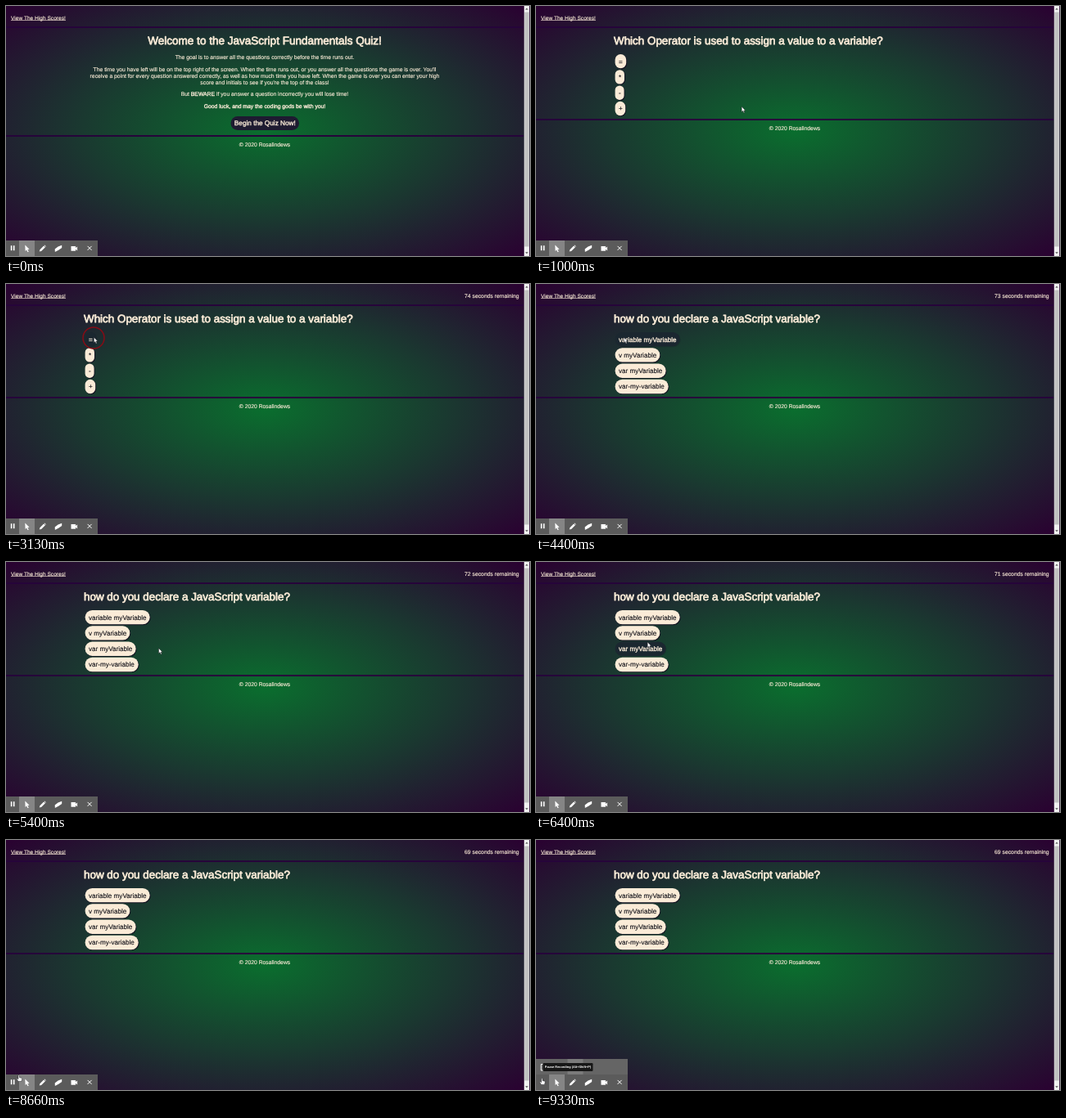
Recreate the animation shown at these times as an HTML page. Size 640x306 px, loop 9.4 s.

```html
<!DOCTYPE html>
<html lang="en">
<head>
<meta charset="utf-8">
<title>JavaScript quiz</title>
<style>
html, body { margin: 0; width: 100%; height: 100%; overflow: hidden; background: #21152f; }
svg { display: block; width: 100vw; height: 100vh; }
text { font-family: "Liberation Sans", Arial, sans-serif; font-size: 6.8px; fill: #faebd7; stroke: #faebd7; stroke-width: .14px; stroke-linejoin: round; text-rendering: geometricPrecision; white-space: pre; }
.bold { stroke-width: .36px; }
.head { font-size: 13.42px; stroke-width: .75px; }
.mid { text-anchor: middle; }
.pill text { font-size: 8.1px; fill: #15151c; stroke: #15151c; }
.pill .face { fill: #faebd7; }
.pill .shade { fill: #140d20; opacity: .85; }
.pill.hot .face { fill: #1b2730; }
.pill.hot .shade { opacity: .15; }
.pill.hot text { fill: #faebd7; stroke: #faebd7; stroke-width: .36px; }
</style>
</head>
<body>
<svg id="stage" viewBox="0 0 640 306" preserveAspectRatio="none">
  <defs>
    <radialGradient id="glow" gradientUnits="userSpaceOnUse" cx="0" cy="0" r="1" gradientTransform="translate(316 153) scale(447 216)">
      <stop offset="0" stop-color="#0a6e2e"/>
      <stop offset=".5" stop-color="#1a3930"/>
      <stop offset="1" stop-color="#2a0131"/>
    </radialGradient>
  </defs>
  <rect width="640" height="306" fill="url(#glow)"/>
  <text x="6" y="16.5" style="font-size:6.6px">View The High Scores!</text>
  <rect x="6" y="17.3" width="67" height=".6" fill="#faebd7"/>
  <text id="timer" x="626.6" y="16.5" text-anchor="end"></text>
  <rect y="25" width="632" height="2" fill="#26043a"/>

  <g id="intro">
    <text class="head mid" x="316" y="47.2" style="font-size:13.54px">Welcome to the JavaScript Fundamentals Quiz!</text>
    <text class="mid" x="316" y="65.3">The goal is to answer all the questions correctly before the time runs out.</text>
    <text class="mid" x="316" y="79.5">The time you have left will be on the top right of the screen. When the time runs out, or you answer all the questions the game is over. You'll</text>
    <text class="mid" x="316" y="87.8">receive a point for every question answered correctly, as well as how much time you have left. When the game is over you can enter your high</text>
    <text class="mid" x="316" y="95.9">score and initials to see if you're the top of the class!</text>
    <text class="mid" x="316" y="110">But <tspan class="bold">BEWARE</tspan> if you answer a question incorrectly you will lose time!</text>
    <text class="mid bold" x="316" y="124.5">Good luck, and may the coding gods be with you!</text>
    <rect x="274.5" y="135" width="83.5" height="17" rx="8.5" fill="#1e1b31"/>
    <text class="mid bold" x="316.3" y="146.4" style="font-size:8.23px">Begin the Quiz Now!</text>
  </g>
  <g id="quiz"></g>
  <g id="foot">
    <rect y="-1" width="632" height="2" fill="#26043a"/>
    <text class="mid" x="316" y="13.4">© 2020 Rosalindews</text>
  </g>

  <rect x="632.8" width="6.4" height="306" fill="#f1f1f1"/>
  <rect x="633.2" y="7.5" width="5.4" height="287" fill="#c1c1c1"/>
  <path d="M634.2 4.6L636 2.6L637.8 4.6ZM634.2 301.2L636 303.2L637.8 301.2Z" fill="#555"/>

  <g id="panel">
    <rect y="268" width="112" height="20" fill="#656565"/>
    <rect x="38.5" y="268" width="19" height="19" fill="#7b7b7b"/>
    <path d="M8.5 274.5H6.2V282H8.5" fill="none" stroke="#fff"/>
  </g>
  <rect y="287" width="112" height="19" fill="#5b5b5b"/>
  <rect x="16" y="287" width="19" height="19" fill="#858585"/>
  <g fill="#fff">
    <path id="pause" d="M5.8 293.3H7.4V299.3H5.8ZM8.9 293.3H10.5V299.3H8.9Z"/>
    <path d="M23.3 292.6L23.6 300L25.1 298.5L26.5 301.3L27.7 300.7L26.4 298L28.5 297.7Z"/>
    <path d="M40.8 300.6L41.4 298.2L46.1 293.5L47.9 295.3L43.2 300ZM46.6 293L47.2 292.5L48.9 294.2L48.4 294.8Z"/>
    <path d="M59.7 297.4L63.6 294.6L68.2 292.8V296L64.2 298.8L59.9 300.9Z"/>
    <path d="M79.5 294.1H85V296L87.1 294.4V299.4L85 297.8V299.8H79.5Z"/>
    <path d="M99.6 293.9L104.6 298.9M104.6 293.9L99.6 298.9" stroke="#fff" stroke-width="1"/>
  </g>
  <g id="tip">
    <rect x="8.5" y="273" width="61" height="10" rx="1.3" fill="#161616"/>
    <text class="mid" x="39" y="279.4" style="font-size:3.9px;font-weight:bold;fill:#fff;stroke:none">Pause Recording (Alt+Shift+P)</text>
  </g>

  <circle id="ring" r="13" fill="none" stroke="#860c16" stroke-width="1.5"/>
  <g id="mouse" stroke="#15151a" stroke-width=".45" fill="#fff">
    <path id="arrow" d="M0 0V6.6L1.5 5.2L2.6 7.7L3.7 7.2L2.6 4.8H4.6Z"/>
    <path id="hand" d="M-.8 -1Q0 -1.9 .7 -1V1.6L3.3 2.2Q4 2.5 3.8 3.5L3.2 6.4H-.7L-2.8 3.4Q-2.6 2.5 -1.7 3L-.8 3.7Z"/>
  </g>
</svg>
<script>
const LOOP = 9400, STEP = 1000 / 15;
const BEGIN_AT = 330, NEXT_AT = 3590;
const PILL_X = 96.6, PILL_H = 17.4;
const $ = id => document.getElementById(id);

// each answer: label, pill width
const quizzes = [
  { ask: "Which Operator is used to assign a value to a variable?",
    answers: [["=", 13.6], ["*", 11.4], ["-", 11], ["+", 12.6]] },
  { ask: "how do you declare a JavaScript variable?",
    answers: [["variable myVariable", 79.1], ["v myVariable", 54.7],
              ["var myVariable", 62], ["var-my-variable", 65.1]] }
];

// cursor: time, x, y
const path = [
  [0, 301, 146], [200, 301, 146], [460, 251.2, 123.1], [1000, 251.2, 123.1],
  [1200, 205, 108], [1400, 205, 108], [1660, 150, 86], [2130, 150, 86],
  [2460, 110, 68], [2600, 107.4, 65.2], [4400, 107.4, 65.2], [4600, 128, 76],
  [4800, 128, 76], [5130, 186.5, 105.4], [5400, 186.5, 105.4], [5900, 150, 119],
  [6400, 136.2, 98], [6730, 128, 124], [7060, 128, 124], [7460, 98, 200],
  [7730, 94, 209], [7867, 86.5, 225], [8660, 16, 289], [8930, 7.3, 293], [9400, 7.3, 293]
];

const clicks = [[130, 330, 301, 146], [3130, 3530, 107, 66]];
const ticks = [1400, 2460, 3590, 4800, 6000, 7060, 8200];

const pillY = i => 58.9 + i * 19.3;

function pill([label, w], i) {
  const y = pillY(i), box = `width="${w}" height="${PILL_H}" rx="${Math.min(PILL_H, w) / 2}"`;
  return `<g class="pill"><rect class="shade" x="${PILL_X + .9}" y="${y + .9}" ${box}/>
    <rect class="face" x="${PILL_X}" y="${y}" ${box}/>
    <text x="101" y="${y + 11.6}">${label}</text></g>`;
}

const pages = quizzes.map(q => {
  const g = document.createElementNS("http://www.w3.org/2000/svg", "g");
  g.innerHTML = `<text class="head" x="95" y="47.2">${q.ask}</text>` + q.answers.map(pill).join("");
  $("quiz").append(g);
  return { g, answers: q.answers, pills: [...g.querySelectorAll(".pill")] };
});

function cursorAt(t) {
  const i = Math.max(1, path.findIndex(p => p[0] > t));
  const [t0, x0, y0] = path[i - 1], [t1, x1, y1] = path[i];
  const k = (t - t0) / (t1 - t0);
  return [x0 + (x1 - x0) * k, y0 + (y1 - y0) * k];
}

const show = (el, on) => el.setAttribute("visibility", on ? "visible" : "hidden");

function draw(ms) {
  const t = Math.floor((ms + 7) / STEP) * STEP;
  const [x, y] = cursorAt(Math.min(t, LOOP - 1));
  const page = t < BEGIN_AT ? -1 : t < NEXT_AT ? 0 : 1;

  show($("intro"), page < 0);
  $("foot").setAttribute("transform", `translate(0 ${page < 0 ? 159 : 139})`);
  pages.forEach((p, n) => {
    show(p.g, n === page);
    p.pills.forEach((el, i) => {
      const dx = x - PILL_X, dy = y - pillY(i);
      el.classList.toggle("hot", dx > 0 && dx < p.answers[i][1] && dy > 0 && dy < PILL_H);
    });
  });

  const passed = ticks.filter(s => t >= s).length;
  $("timer").textContent = passed ? `${76 - passed} seconds remaining` : "";

  const click = clicks.find(c => t >= c[0] && t < c[1]);
  show($("ring"), click);
  if (click) $("ring").setAttribute("transform", `translate(${click[2]} ${click[3]})`);

  const overBar = t >= 8660;
  show($("mouse"), t > 0);
  $("mouse").setAttribute("transform", `translate(${x} ${y})`);
  $("arrow").style.display = overBar ? "none" : "";
  $("hand").style.display = overBar ? "" : "none";
  show($("pause"), t < 8930);
  show($("panel"), t >= 8790);
  show($("tip"), t >= 9190);
}

const start = performance.now();
function frame() {
  draw((performance.now() - start) % LOOP);
  requestAnimationFrame(frame);
}
frame();
</script>
</body>
</html>
```
